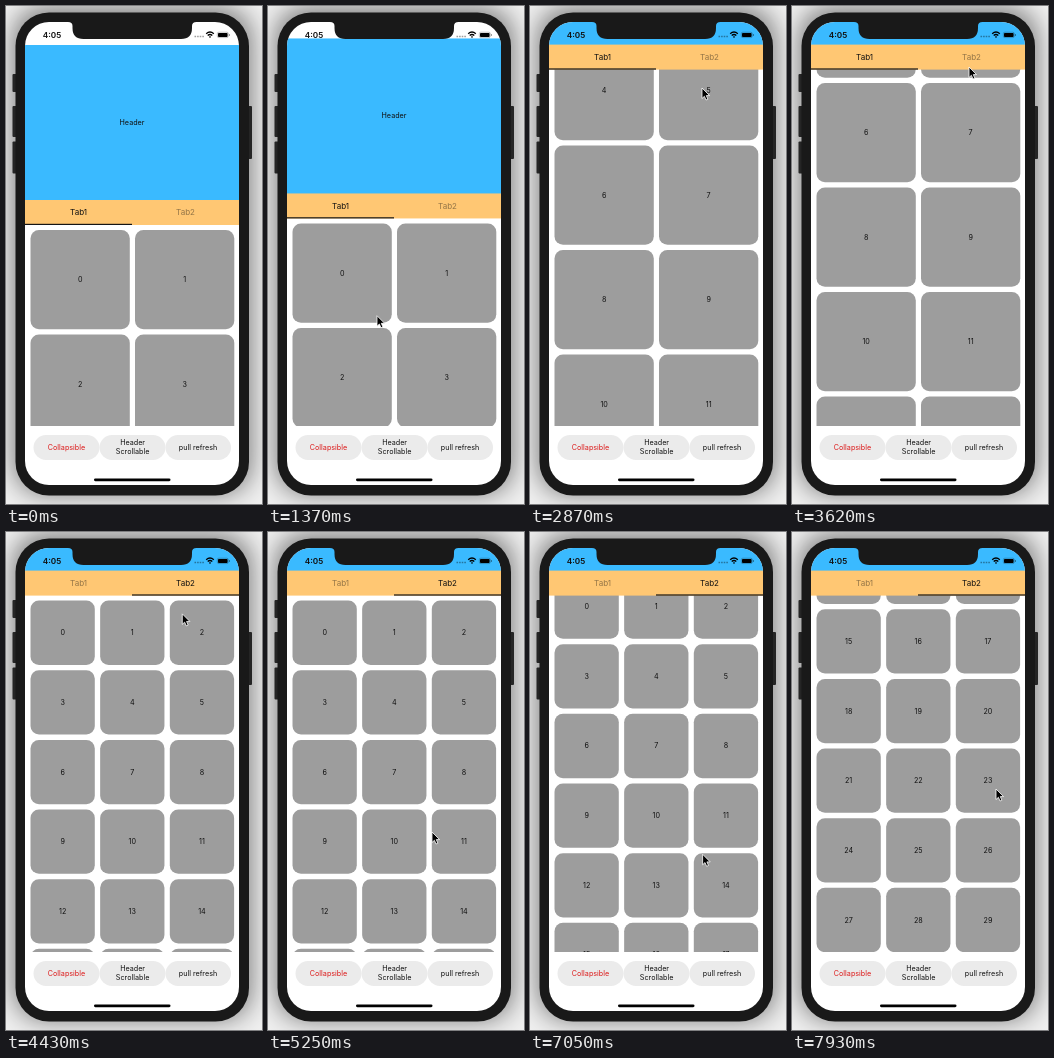
An HTML page for the animation above (8000 ms loop, 256 by 498 pixels).

```html
<!DOCTYPE html>
<html lang="en">
<head>
<meta charset="utf-8">
<title>Collapsible tabs</title>
<style>
  html, body { margin: 0; width: 100%; height: 100%; overflow: hidden; background: #eee; }
  svg { display: block; width: 100vw; height: 100vh; }
  text { font-family: Inter, Roboto, sans-serif; font-size: 7.2px; text-anchor: middle; fill: #111; }
  .tab { font-size: 8px; }
  .clock { font-size: 8.2px; font-weight: 600; }
  .card { fill: #9d9d9d; }
  .pill { fill: #ebebeb; }
</style>
</head>
<body>
<svg viewBox="0 0 256 498" preserveAspectRatio="none">
  <defs>
    <clipPath id="screen"><rect x="19" y="16" width="214" height="463" rx="24"/></clipPath>
    <clipPath id="list"><rect x="19" y="39" width="214" height="381"/></clipPath>
    <filter id="blur" x="-30%" y="-20%" width="160%" height="140%"><feGaussianBlur stdDeviation="13"/></filter>
  </defs>

  <rect width="256" height="498" fill="#f0f0f0"/>
  <rect x="8" y="2" width="237" height="486" rx="30" opacity=".5" filter="url(#blur)"/>

  <g fill="#252525">
    <rect x="6.5" y="68" width="6" height="18" rx="1"/>
    <rect x="6.5" y="100" width="6" height="31" rx="1"/>
    <rect x="6.5" y="135.5" width="6" height="32" rx="1"/>
    <rect x="240" y="100" width="6" height="53" rx="1"/>
  </g>
  <rect x="9.5" y="6.5" width="233.5" height="483" rx="33.5" fill="#191919"/>

  <g clip-path="url(#screen)">
    <rect x="19" y="16" width="214" height="463" fill="#fff"/>
    <g clip-path="url(#list)">
      <g id="grid1"></g>
      <g id="grid2"></g>
    </g>
    <g id="header">
      <rect x="19" y="39" width="214" height="156" fill="#3abaff"/>
      <text x="126" y="118.7">Header</text>
      <rect x="19" y="194" width="214" height="25" fill="#ffc773"/>
      <text class="tab" id="tab1" x="72.6" y="209.2">Tab1</text>
      <text class="tab" id="tab2" x="179.5" y="209.2">Tab2</text>
      <rect id="line" x="19" y="217.8" width="107" height="1.2" fill="#151515"/>
    </g>

    <rect class="pill" x="27.5" y="429" width="66" height="25" rx="12.5"/>
    <rect class="pill" x="93.5" y="429" width="66" height="25" rx="12.5"/>
    <rect class="pill" x="159.5" y="429" width="65.5" height="25" rx="12.5"/>
    <text x="60.5" y="443.6" style="fill:#dc1717">Collapsible</text>
    <text x="126.6" y="439">Header</text>
    <text x="126.6" y="448">Scrollable</text>
    <text x="192" y="443.6">pull refresh</text>
    <rect x="88" y="472.5" width="76.5" height="2.7" rx="1.35"/>

    <path d="M62 16Q66.500 16 66.500 20V22Q66.500 33 77.500 33H175Q186 33 186 22V20Q186 16 190.500 16V14H62Z" fill="#191919"/>
    <text class="clock" x="46" y="31.7">4:05</text>
    <path d="M188.500 30.500h9.500" stroke="#000" stroke-opacity=".38" stroke-width="1.5" stroke-dasharray="1.6 1"/>
    <path d="M200.200 27.700Q204 24.500 207.800 27.700M201.700 29.500Q204 27.600 206.300 29.500" fill="none" stroke="#000" stroke-width="1.4"/>
    <path d="M202.800 30.700Q204 29.800 205.200 30.700L204 32Z"/>
    <rect x="211.3" y="26.2" width="11" height="5.4" rx="1.5" fill="none" stroke="#000" stroke-opacity=".4" stroke-width=".6"/>
    <rect x="212" y="26.9" width="9.6" height="4" rx=".9"/>
    <path d="M223 28v2q1-.2 1-1t-1-1" opacity=".5"/>
  </g>

  <path id="cursor" d="M0 0V10.500L2.400 8.300L4 12L5.900 11.200L4.300 7.600H7.600Z" stroke="#fff" stroke-width=".8" stroke-linejoin="round"/>
</svg>

<script>
const LOOP = 8000, COLLAPSE = 155.4, PAGE = 214;
const $ = id => document.getElementById(id);

function add(parent, tag, attrs, text = '') {
  const el = document.createElementNS('http://www.w3.org/2000/svg', tag);
  for (const name in attrs) el.setAttribute(name, attrs[name]);
  el.textContent = text;
  parent.append(el);
}

function fillGrid(grid, columns, size, pitch) {
  for (let i = 0; i < 30; i++) {
    const x = 24.5 + i % columns * pitch;
    const y = 224 + Math.floor(i / columns) * pitch;
    add(grid, 'rect', { class: 'card', x, y, width: size, height: size, rx: 8.5 });
    add(grid, 'text', { x: x + size / 2, y: y + size / 2 + 2.5 }, i);
  }
}
fillGrid($('grid1'), 2, 99.3, 104.5);
fillGrid($('grid2'), 3, 64.3, 69.65);

const progress = (time, start, length) => Math.min(1, Math.max(0, (time - start) / length));

// A drag eases in and out; a fling starts fast and decays.
function drag(...span) {
  const p = progress(...span);
  return p * p * (3 - 2 * p);
}
const fling = (...span) => 1 - (1 - progress(...span)) ** 3;

const scrollFirst = t => 147 * drag(t, 1250, 950) + 313.5 * fling(t, 2330, 1300);

const scrollSecond = t => COLLAPSE - (COLLAPSE + 12) * drag(t, 5300, 850)
  + 12 * drag(t, 6150, 400) + 130 * drag(t, 6700, 400) + 365 * fling(t, 7000, 930);

// Resting points of the pointer: time, x, y
const stops = [[500, 262, 350], [1200, 109, 325], [2000, 109, 195], [2870, 172, 82],
  [3620, 177, 61], [4200, 178, 51], [5250, 164, 300], [6430, 154, 361], [7930, 204, 257]];

function pointer(time) {
  let [last, x, y] = stops[0];
  for (const [at, nextX, nextY] of stops.slice(1)) {
    const p = drag(time, last, at - last);
    x += (nextX - x) * p;
    y += (nextY - y) * p;
    last = at;
  }
  return [x, y];
}

const move = (id, x, y) => $(id).setAttribute('transform', `translate(${x.toFixed(2)} ${y.toFixed(2)})`);

function draw(time) {
  const first = scrollFirst(time), second = scrollSecond(time);
  const page = fling(time, 3950, 350);

  move('grid1', -page * PAGE, -first);
  move('grid2', (1 - page) * PAGE, -second);
  move('header', 0, -Math.min(COLLAPSE, page > 0 ? second : first));
  move('line', page * PAGE / 2, 0);
  $('tab1').style.opacity = 1 - page * .55;
  $('tab2').style.opacity = .45 + page * .55;
  move('cursor', ...pointer(time));
}

const start = performance.now();
function tick() {
  draw((performance.now() - start) % LOOP);
  requestAnimationFrame(tick);
}
tick();
</script>
</body>
</html>
```
